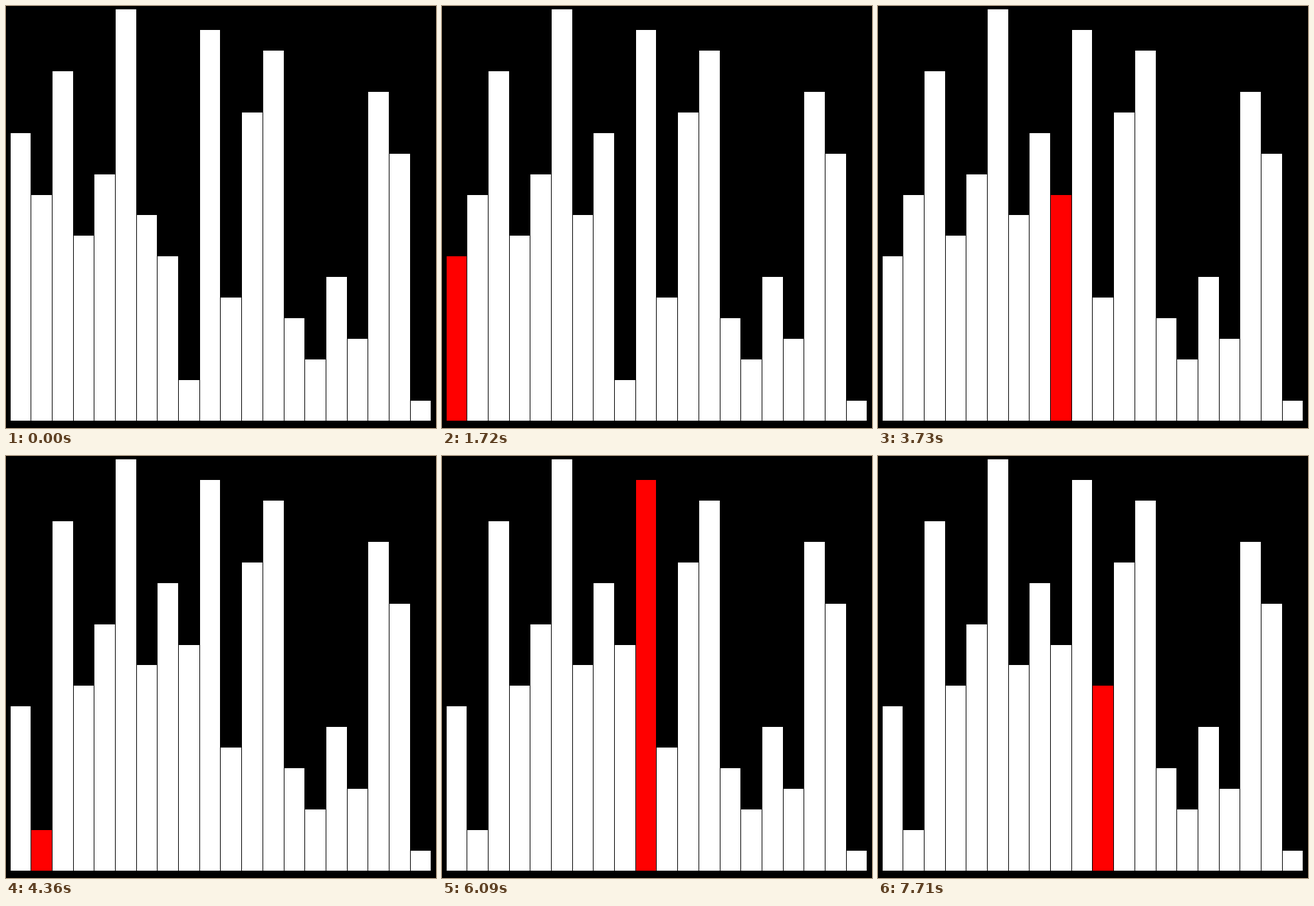
Animation, 647 px wide and 634 px high, one loop 8 s. Source, as a matplotlib script:

```python
import math

import matplotlib.pyplot as plt
from matplotlib.animation import FuncAnimation
from matplotlib.collections import PolyCollection

W, H, DPI = 647, 634, 64
LOOP_MS, TICK_MS = 8000, 10

START = [14, 11, 17, 9, 12, 20, 10, 8, 2, 19, 6, 15, 18, 5, 3, 7, 4, 16, 13, 1]
BASE = 623

# Gap-7 pass of a shell sort: (time in ms, highlighted bar, value written to it)
STEPS = [
    (0, None, None),
    (170, 7, None), (710, 0, None), (1320, 7, 14), (1720, 0, 8), (2500, None, None),
    (2580, 8, None), (3140, None, None), (3190, 1, None), (3730, 8, 11),
    (4290, None, None), (4360, 1, 2),
    (5380, 9, None), (5530, 2, None), (6090, 9, None), (6680, None, None),
    (6780, 10, None), (7240, None, None), (7330, 3, None), (7710, 10, 9),
]


def left_edge(i):
    return math.floor(7.05 + 31.69 * i)


def bar(i, value):
    x0, x1 = left_edge(i), left_edge(i + 1) - 1
    top = math.floor(623.95 - 30.9 * value)
    return [(x0, top), (x1, top), (x1, BASE), (x0, BASE)]


def state_at(ms):
    values, active = START.copy(), None
    for time, index, written in STEPS:
        if time > ms:
            break
        active = index
        if written is not None:
            values[index] = written
    return values, active


fig = plt.figure(figsize=(W / DPI, H / DPI), dpi=DPI, facecolor="black")
ax = fig.add_axes([0, 0, 1, 1])
ax.set_xlim(0, W)
ax.set_ylim(H, 0)
ax.axis("off")
bars = PolyCollection([], linewidths=0, edgecolors="none", antialiaseds=False)
ax.add_collection(bars, autolim=False)


def update(frame):
    values, active = state_at(frame * TICK_MS)
    bars.set_verts([bar(i, v) for i, v in enumerate(values)])
    bars.set_facecolor(["red" if i == active else "white" for i in range(len(values))])
    return [bars]


anim = FuncAnimation(fig, update, frames=LOOP_MS // TICK_MS, interval=TICK_MS,
                     repeat=True, repeat_delay=0)
plt.show()
```
